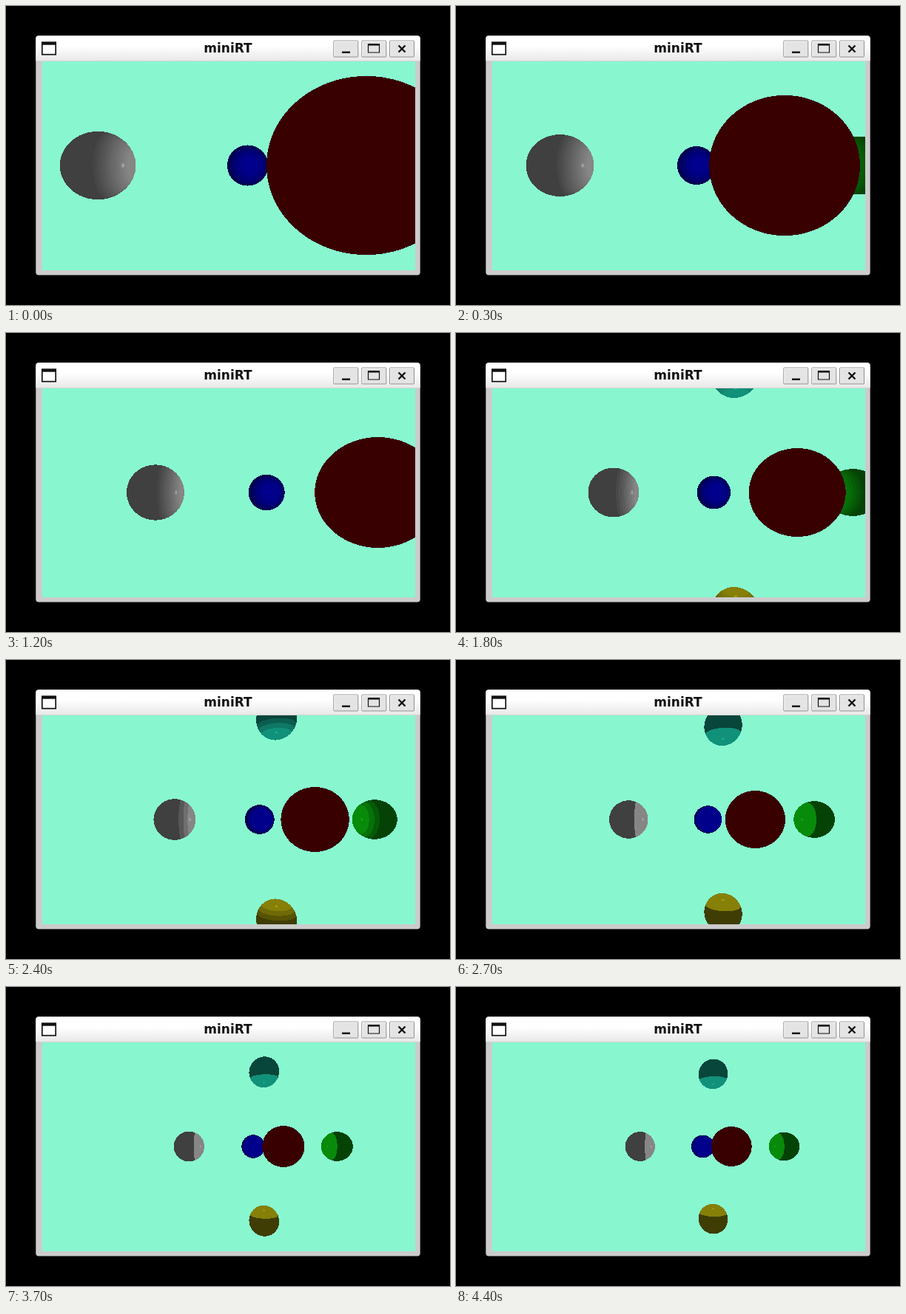
An HTML page with a canvas for the animation above (4.5 s loop, 600x405 px).

```html
<!DOCTYPE html>
<html>
<head>
<meta charset="utf-8">
<style>
html, body { margin: 0; width: 100%; height: 100%; overflow: hidden; background: #000; }
svg, canvas { position: absolute; left: 0; top: 0; }
canvas { left: 48.5px; top: 74.5px; }
text { font: bold 17px "DejaVu Sans", sans-serif; text-anchor: middle; fill: #111; }
</style>
</head>
<body>
<svg width="600" height="405">
  <defs>
    <linearGradient id="bar" x2="0" y2="1">
      <stop offset=".4" stop-color="#fff"/><stop offset="1" stop-color="#e8e8e8"/>
    </linearGradient>
    <g id="button">
      <rect x=".5" y=".5" width="33" height="22" rx="1" fill="#e4e4e4" stroke="#909090"/>
      <path d="M1.5 21.5V1.5H32.5" fill="none" stroke="#f4f4f4"/>
    </g>
  </defs>
  <rect x="40.3" y="40.3" width="519.4" height="324.2" rx="4" fill="#ccc"/>
  <path d="M40.3 74.3V44.3q0-4 4-4H555.7q4 0 4 4V74.3z" fill="url(#bar)"/>
  <g transform="translate(0 -.5)">
    <rect x="48.8" y="49.8" width="18.4" height="16.4" fill="#fff" stroke="#111" stroke-width="1.7"/>
    <path d="M48 51.2H68" stroke="#111" stroke-width="4"/>
    <text x="300" y="63">miniRT</text>
    <use href="#button" x="442.3" y="47"/>
    <use href="#button" x="480.3" y="47"/>
    <use href="#button" x="518" y="47"/>
    <g fill="none" stroke="#111">
      <path d="M454 63.2H465" stroke-width="2.4"/>
      <path d="M489.5 52V63.5H504.5V52" stroke-width="1.2"/>
      <path d="M489 52.8H505" stroke-width="2.6"/>
      <path d="M530.5 54L539.5 63M539.5 54L530.5 63" stroke-width="2.4"/>
    </g>
  </g>
</svg>
<canvas width="504" height="283"></canvas>
<script>
const W = 504, H = 283, FOCAL = 360, YAW = 0.053;
const ctx = document.querySelector('canvas').getContext('2d');
const image = ctx.createImageData(W, H);
const sky = [136, 247, 208];

// Unit spheres around a light at the origin: x, y, z, ambient colour
const spheres = [
  [-5, 0, 0, [64, 64, 64]],
  [5, 0, 0, [4, 66, 5]],
  [0, -5, 0, [8, 69, 58]],
  [0, 5, 0, [64, 61, 4]],
  [0, 0, 5, [0, 0, 66]],
  [0, 0, -5, [57, 0, 0]]
];

// Light position relative to the camera: time, value
const sideways = [[0, 1.19], [850, 1.19], [1180, 2.37]];
const depth = [[0, 8.13], [80, 8.13], [580, 9.9], [1460, 9.9], [1800, 11.08],
  [2400, 13.25], [3100, 15.65], [3830, 18.4]];

function track(keys, t) {
  const i = keys.findIndex(k => k[0] > t);
  if (i < 0) return keys[keys.length - 1][1];
  const [t0, a] = keys[i - 1], [t1, b] = keys[i];
  return a + (b - a) * (t - t0) / (t1 - t0);
}

const dot = (a, b) => a[0] * b[0] + a[1] * b[1] + a[2] * b[2];
const sub = (a, b) => [a[0] - b[0], a[1] - b[1], a[2] - b[2]];
const unit = a => {
  const n = Math.hypot(...a);
  return a.map(v => v / n);
};

const rays = Array.from({ length: W * H }, (_, n) =>
  unit([n % W + 0.5 - W / 2, Math.floor(n / W) + 0.5 - 141, FOCAL]));

function shade(ray, t, ball, light, bands) {
  const p = ray.map(v => v * t);
  const normal = sub(p, ball.c);
  const toLight = unit(sub(light, p));
  const facing = dot(normal, toLight);
  if (facing <= 0) return ball.color;
  const diffuse = Math.min(1, Math.round(facing * (bands + 1.5)) / bands);
  const mirror = normal.map((v, i) => 2 * facing * v - toLight[i]);
  const shine = Math.max(0, -dot(mirror, ray)) ** 200;
  return ball.color.map(v => v * (1 + 1.1 * diffuse + 0.8 * shine));
}

function render(t) {
  const light = [track(sideways, t), 0, track(depth, t)];
  // Shading gets coarser as the camera backs away
  const bands = Math.max(1, Math.round(35 - 2.4 * light[2]));
  const cos = Math.cos(YAW), sin = Math.sin(YAW);
  const balls = spheres.map(([x, y, z, color]) => {
    const c = [light[0] + x * cos - z * sin, y, light[2] + x * sin + z * cos];
    return { c, color, k: dot(c, c) - 1 };
  });
  rays.forEach((ray, n) => {
    let near = Infinity, hit = null;
    for (const ball of balls) {
      const b = dot(ray, ball.c), d = b * b - ball.k;
      if (d < 0) continue;
      const dist = b - Math.sqrt(d);
      if (dist < near) { near = dist; hit = ball; }
    }
    const rgb = hit ? shade(ray, near, hit, light, bands) : sky;
    for (let i = 0; i < 3; i++) image.data[n * 4 + i] = rgb[i];
    image.data[n * 4 + 3] = 255;
  });
  ctx.putImageData(image, 0, 0);
}

let shown = -1;
function tick() {
  const step = Math.floor(performance.now() % 4500 / 100);
  if (step !== shown) render((shown = step) * 100);
  requestAnimationFrame(tick);
}
tick();
</script>
</body>
</html>
```
